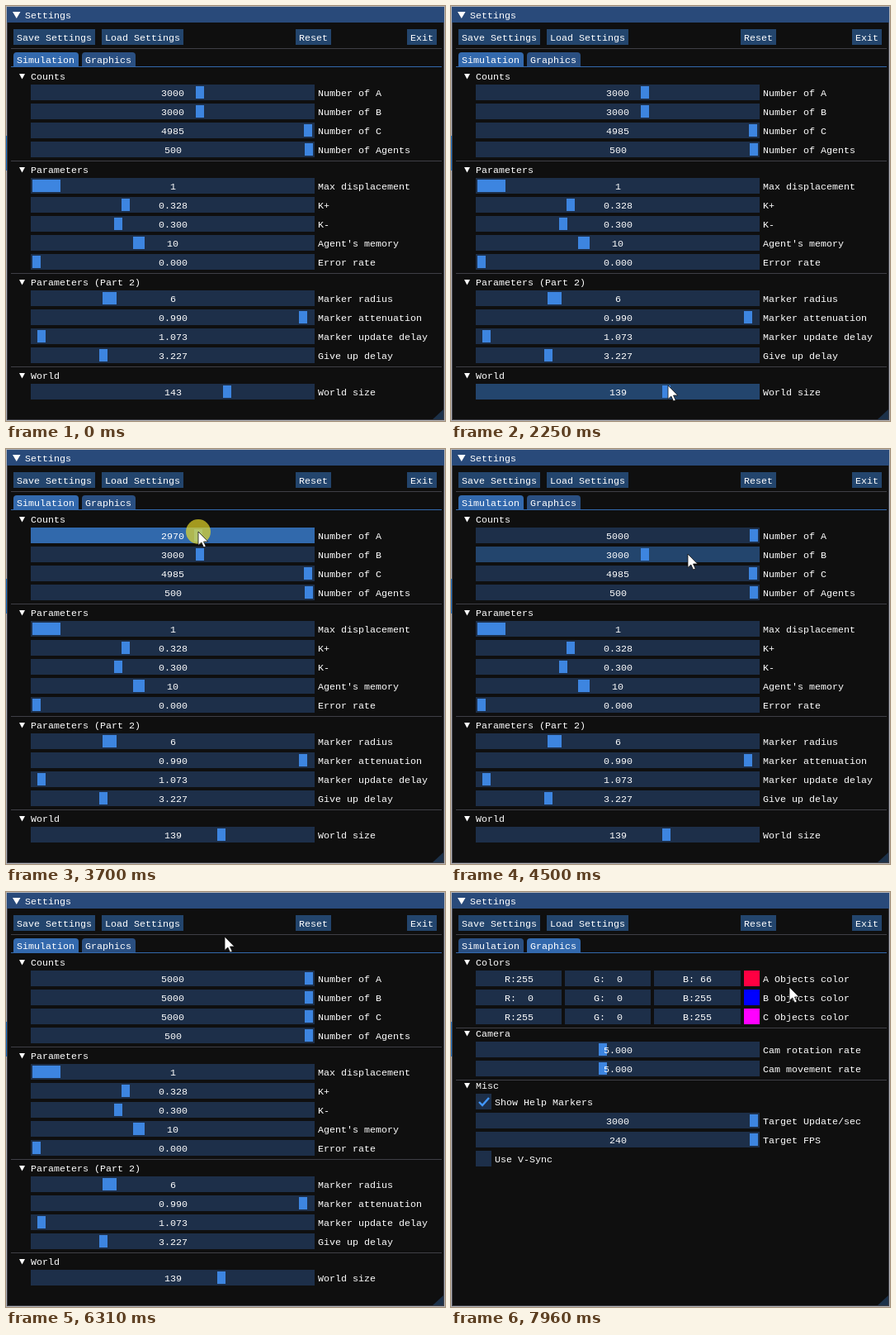
Write an HTML page that moves like this. It is 532 px wide and 502 px high and loops after 8000 ms.

```html
<!DOCTYPE html>
<html lang="en">
<head>
<meta charset="utf-8">
<title>Settings</title>
<style>
  html, body { margin: 0; width: 100%; height: 100%; overflow: hidden; background: #0f0f0f; }
  svg { display: block; }
  rect { shape-rendering: crispEdges; }
  text { font: 11.667px "Liberation Mono", monospace; fill: #fff; white-space: pre; }
</style>
</head>
<body>
<svg id="stage" width="532" height="502" viewBox="0 0 532 502"></svg>
<script>
const LOOP = 8000, HOVER_LAG = 50;
const C = {
  frame: '#1d2f49', hover: '#23456d', active: '#3169ac',
  grab: '#3d85e0', grabActive: '#4296fa', line: '#3f3f46',
  tab: '#2a4f81', tabOn: '#3369ad', tabHover: '#387bcb'
};

// ---- drawing helpers ----
function add(parent, tag, attrs, text) {
  const el = document.createElementNS('http://www.w3.org/2000/svg', tag);
  for (const k in attrs) el.setAttribute(k, attrs[k]);
  if (text !== undefined) el.textContent = text;
  return parent.appendChild(el);
}
const box = (p, x, y, width, height, fill) => add(p, 'rect', { x, y, width, height, fill });
const label = (p, x, mid, s) => add(p, 'text', { x, y: mid + 4 }, s);
const centred = (p, x, mid, s) => label(p, x - Math.floor(s.length * 3.5), mid, s);
const shape = (p, d, fill) => add(p, 'path', { d, fill });
const rule = (p, y) => box(p, 6, y, 522, 1, C.line);
function heading(p, mid, s) {
  shape(p, `M16 ${mid - 3}h7l-3.5 6.5z`, '#fff');
  label(p, 30, mid, s);
}
const hot = [];
function field(p, x, mid, w) {
  const el = box(p, x, mid - 10, w, 19, C.frame);
  hot.push({ el, page: p, x, y: mid - 10, w });
  return el;
}
function slider(p, mid, name, value, grabX, grabW = 10) {
  const bg = field(p, 30, mid, 344);
  const grab = box(p, grabX, mid - 8, grabW, 15, C.grab);
  const text = centred(p, 202, mid, value);
  label(p, 378, mid, name);
  return { bg, grab, text };
}
function button(x, w, s) {
  box(stage, x, 28, w, 19, C.hover);
  label(stage, x + 4, 38, s);
}
function tab(x, w, s) {
  const el = shape(stage, `M${x} 73v-13q0-4 4-4h${w - 8}q4 0 4 4v13z`, C.tab);
  label(stage, x + 4, 65, s);
  return el;
}

// ---- window ----
const stage = document.getElementById('stage');
box(stage, 0, 0, 532, 502, '#b4b4b8');
box(stage, 0, 157, 1, 42, '#1a6fc4');
box(stage, 1, 1, 530, 500, C.line);
box(stage, 2, 1, 528, 499, '#0f0f0f');
box(stage, 1, 1, 530, 19, '#294a7a');
shape(stage, 'M8 7h9.5l-4.75 8z', '#fff');
label(stage, 23, 11, 'Settings');
shape(stage, 'M530 488v12h-13z', '#1c3149');
button(9, 99, 'Save Settings');
button(116, 99, 'Load Settings');
button(351, 43, 'Reset');
button(486, 36, 'Exit');
rule(stage, 51);
const simTab = tab(9, 79, 'Simulation');
const gfxTab = tab(92, 65, 'Graphics');
box(stage, 6, 73, 522, 1, C.tabOn);

// ---- simulation page ----
const sim = add(stage, 'g', {});
heading(sim, 85, 'Counts');
const countA = slider(sim, 105, 'Number of A', '3000', 230);
const countB = slider(sim, 128, 'Number of B', '3000', 230);
const countC = slider(sim, 151, 'Number of C', '4985', 361);
slider(sim, 174, 'Number of Agents', '500', 362);
rule(sim, 187);
heading(sim, 198, 'Parameters');
slider(sim, 218, 'Max displacement', '1', 32, 34);
slider(sim, 241, 'K+', '0.328', 140);
slider(sim, 264, 'K-', '0.300', 131);
slider(sim, 287, "Agent's memory", '10', 154, 14);
slider(sim, 310, 'Error rate', '0.000', 32);
rule(sim, 323);
heading(sim, 334, 'Parameters (Part 2)');
slider(sim, 354, 'Marker radius', '6', 117, 17);
slider(sim, 377, 'Marker attenuation', '0.990', 355);
slider(sim, 400, 'Marker update delay', '1.073', 38);
slider(sim, 423, 'Give up delay', '3.227', 113);
rule(sim, 436);
heading(sim, 447, 'World');
const world = slider(sim, 467, 'World size', '143', 263);

// ---- graphics page ----
const gfx = add(stage, 'g', {});
heading(gfx, 85, 'Colors');
[['A', 255, 0, 66], ['B', 0, 0, 255], ['C', 255, 0, 255]].forEach(([name, ...rgb], i) => {
  const mid = 105 + 23 * i;
  rgb.forEach((v, k) => {
    const x = 30 + 108 * k;
    field(gfx, x, mid, k < 2 ? 104 : 105);
    centred(gfx, x + 52, mid, 'RGB'[k] + ':' + String(v).padStart(3));
  });
  box(gfx, 355, mid - 10, 19, 19, `rgb(${rgb})`);
  label(gfx, 378, mid, name + ' Objects color');
});
rule(gfx, 164);
heading(gfx, 171, 'Camera');
slider(gfx, 191, 'Cam rotation rate', '5.000', 179);
slider(gfx, 214, 'Cam movement rate', '5.000', 179);
rule(gfx, 227);
heading(gfx, 234, 'Misc');
field(gfx, 30, 254, 19);
add(gfx, 'path', { d: 'M34 254l4 4 8-9', fill: 'none', stroke: C.grabActive, 'stroke-width': 2.4 });
label(gfx, 53, 254, 'Show Help Markers');
slider(gfx, 277, 'Target Update/sec', '3000', 362);
slider(gfx, 300, 'Target FPS', '240', 362);
field(gfx, 30, 323, 19);
label(gfx, 53, 323, 'Use V-Sync');

// ---- pointer ----
const halo = add(stage, 'circle', { r: 15, fill: '#ebdc28', 'fill-opacity': 0.68 });
const arrow = add(stage, 'path', {
  d: 'M0 0V16.5L3.8 13 6.6 19 9.2 17.8 6.5 12H11.8Z',
  fill: '#fff', stroke: '#111', 'stroke-width': 0.8
});

// time, x, y
const path = [
  [950, 298, 499], [1370, 269, 468], [1540, 269, 468], [1900, 261, 465], [2090, 261, 465],
  [2880, 280, 358], [3280, 232, 95], [3430, 232, 95], [3440, 231, 95], [3690, 231, 95],
  [3705, 234, 101], [4050, 403, 103], [4150, 403, 106], [4500, 287, 127], [4570, 287, 127],
  [4800, 517, 122], [4990, 440, 166], [5140, 372, 152], [5310, 372, 152], [5455, 386, 153],
  [5690, 386, 153], [5850, 345, 174], [6310, 265, 54], [6470, 281, 50], [6580, 304, 49],
  [6860, 304, 49], [7090, 125, 61], [7640, 125, 61], [7740, 132, 100], [7880, 340, 123],
  [7960, 410, 115], [8000, 410, 115]
];

// slider, press, release, min, max, starting value
const drags = [
  [world, 1540, 1920, 10, 200, 143],
  [countA, 3700, 4150, 0, 5000, 3000],
  [countB, 4570, 4830, 0, 5000, 3000],
  [countC, 5310, 5700, 0, 5000, 4985]
];
const TAB_PRESS = 7320, TAB_RELEASE = 7390;

const clamp = (v, lo, hi) => Math.min(hi, Math.max(lo, v));
const slope = (i, k) => path[i] && path[i + 1]
  ? (path[i + 1][k] - path[i][k]) / (path[i + 1][0] - path[i][0]) : 0;
// Monotone tangent: zero at rests and turning points
function tangent(i, k) {
  const a = slope(i - 1, k), b = slope(i, k);
  return a * b > 0 ? 2 * a * b / (a + b) : 0;
}
function pointer(t) {
  t = clamp(t, path[0][0], LOOP - 1);
  const i = path.findIndex(p => p[0] > t) - 1;
  const h = path[i + 1][0] - path[i][0], u = (t - path[i][0]) / h;
  return [1, 2].map(k => {
    const p = path[i][k], q = path[i + 1][k];
    const s = u * u * (3 - 2 * u);
    return Math.round(p + (q - p) * s
      + h * u * (1 - u) * ((1 - u) * tangent(i, k) - u * tangent(i + 1, k)));
  });
}

function draw(t) {
  const [x, y] = pointer(t), [hx, hy] = pointer(t - HOVER_LAG);
  const graphics = t >= TAB_PRESS;
  const page = graphics ? gfx : sim;
  sim.style.display = graphics ? 'none' : '';
  gfx.style.display = graphics ? '' : 'none';

  let held = t >= TAB_PRESS && t < TAB_RELEASE;
  const dragging = drags.some(d => t >= d[1] && t < d[2]);
  const canHover = t >= 1540 && !dragging && !held;
  for (const f of hot) {
    const over = canHover && f.page === page
      && hx >= f.x && hx < f.x + f.w && hy >= f.y && hy < f.y + 19;
    f.el.setAttribute('fill', over ? C.hover : C.frame);
  }

  for (const [s, press, release, min, max, start] of drags) {
    const down = t >= press && t < release;
    let v = start;
    if (t >= press) {
      const mx = pointer(Math.min(t, release))[0];
      v = Math.round(min + (max - min) * clamp((mx - 37) / 330, 0, 1));
    }
    const str = String(v);
    s.text.textContent = str;
    s.text.setAttribute('x', 202 - Math.floor(str.length * 3.5));
    s.grab.setAttribute('x', Math.round(32 + 330 * (v - min) / (max - min)));
    s.grab.setAttribute('fill', down ? C.grabActive : C.grab);
    if (down) s.bg.setAttribute('fill', C.active);
    held = held || down;
  }

  const overTab = t > 6860 && hx >= 92 && hx < 157 && hy >= 56 && hy < 73;
  simTab.setAttribute('fill', graphics ? C.tab : C.tabOn);
  gfxTab.setAttribute('fill', overTab ? C.tabHover : graphics ? C.tabOn : C.tab);

  arrow.style.display = t < path[0][0] ? 'none' : '';
  halo.style.display = held ? '' : 'none';
  arrow.setAttribute('transform', `translate(${x} ${y})`);
  halo.setAttribute('cx', x);
  halo.setAttribute('cy', y);
}

const began = performance.now();
function tick() {
  draw((performance.now() - began) % LOOP);
  requestAnimationFrame(tick);
}
tick();
</script>
</body>
</html>
```
